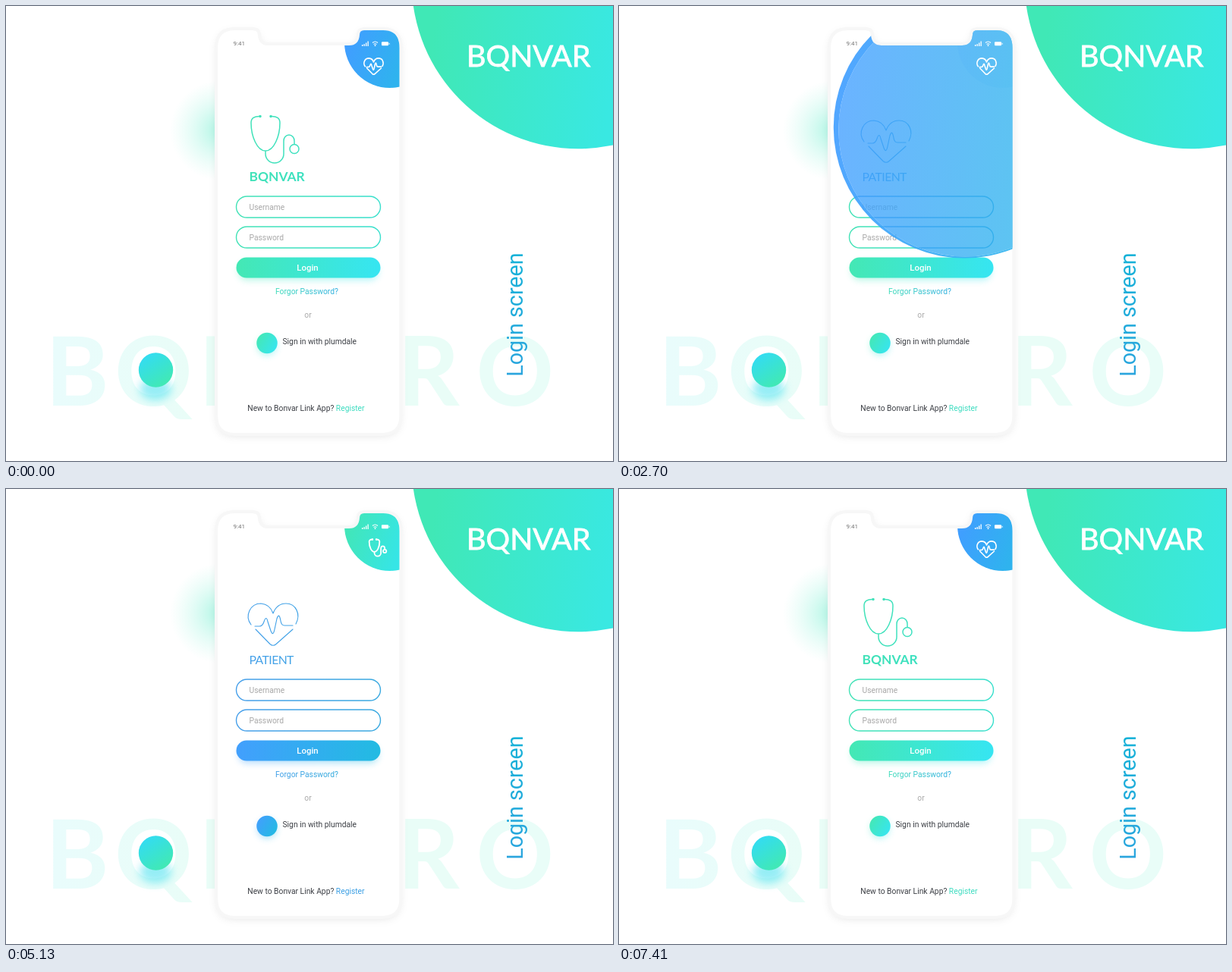
These frames come from a looping animation (800x600 px, 7500 ms). An HTML page:

```html
<!DOCTYPE html>
<html lang="en">
<head>
<meta charset="utf-8">
<title>Login screen</title>
<style>
  html, body { margin: 0; width: 100%; height: 100%; overflow: hidden; background: #fff; }
  svg { display: block; width: 100vw; height: 100vh; }
  text { font-family: Roboto, "Open Sans", sans-serif; font-size: 10.3px; }
  .brand { font-family: Lato, "Open Sans", sans-serif; }
  .line { fill: none; stroke-linecap: round; stroke-linejoin: round; }
</style>
</head>
<body>
<svg id="stage" viewBox="0 0 800 600"></svg>
<script>
const LOOP = 7500, TO_PATIENT = 2250, TO_DOCTOR = 5390, GROW = 550, FULL = 1.42;
const clamp = v => Math.max(0, Math.min(1, v));
const mix = (a, b, u) => a + (b - a) * u;
const easeOut = u => 1 - (1 - u) ** 3;
const easeInOut = u => u < 0.5 ? 4 * u ** 3 : 1 - (2 - 2 * u) ** 3 / 2;

const grad = (id, x1, y1, x2, y2, a, b) =>
  `<linearGradient id="${id}" gradientUnits="userSpaceOnUse" x1="${x1}" y1="${y1}" x2="${x2}" y2="${y2}">
    <stop stop-color="${a}"/><stop offset="1" stop-color="${b}"/></linearGradient>`;

const BODY = "M301 32H325Q332 32 332 38Q333 52 346 52H452Q465 52 466 38Q466 32 472 32H497" +
  "Q518.500 32 518.500 55V540Q518.500 563 496 563H301Q279 563 279 540V55Q279 32 301 32Z";

const STETH = `<path d="M335 145.500Q323 145 323 154C323 172 331 191 342 191S361 172 361 154
  Q361 145 349 145.500M342 191V195A12 12 0 0 0 366 195V178A7 8 0 0 1 380 178V182"/>
  <circle cx="380" cy="188.500" r="6"/><circle cx="335" cy="145.500" r="1"/><circle cx="349" cy="145.500" r="1"/>`;
const HEART = `<path d="M323 179C314 167 322 151 336 151Q348 152 352 164Q357 151 369 151C382 151 389 165 382 178
  M329 185L348 204.500Q352 208 356 204.500L378 185
  M328 181H334Q338 181 340 175Q343 166 345 175L349 187Q352 195 354 185L357 171Q360 162 362 174Q363 180 367 180H378"/>`;

const modes = {
  doctor: {
    icon: STETH, width: 1.5, title: "BQNVAR", size: 17.4, weight: 700, spacing: 0, link: "#3ddcc0",
    button: ["#44e8b4", "#36e5f2"], ink: ["#42e2b6", "#38dfcc"], text: ["#3fdcba", "#2caee0"]
  },
  patient: {
    icon: HEART, width: 1.15, title: "PATIENT", size: 15.8, weight: 400, spacing: -0.6, link: "#3b9fe4",
    button: ["#429ffd", "#22bbe2"], ink: ["#48a0ea", "#3aa9e0"], text: ["#42a0e8", "#2fa9dc"]
  }
};

const field = (y, label, ink) =>
  `<rect x="303.500" y="${y}" width="190" height="28" rx="14" fill="none" stroke="url(#${ink})" stroke-width="1.400"/>
   <text x="320.500" y="${y + 17.9}" fill="#a8a8a8">${label}</text>`;

function screen(name) {
  const m = modes[name], ink = name + "Ink", btn = name + "Btn", txt = name + "Txt", fb = name + "Dot";
  return `<defs>
    ${grad(btn, 303, 340, 494, 350, ...m.button)}
    ${grad(ink, 303, 0, 494, 0, ...m.ink)}
    ${grad(txt, 355, 0, 438, 0, ...m.text)}
    ${grad(fb, 331, 436, 358, 452, ...m.button)}</defs>
  <g id="${name}">
    <path d="${BODY}" fill="#fff"/>
    <g class="line" stroke="url(#${ink})" stroke-width="${m.width}">${m.icon}</g>
    <text class="brand" x="320.500" y="231.300" fill="url(#${ink})"
      style="font-size:${m.size}px;font-weight:${m.weight};letter-spacing:${m.spacing}px">${m.title}</text>
    ${field(251, "Username", ink)}${field(291, "Password", ink)}
    <rect x="306" y="337" width="185" height="25" rx="12" fill="url(#${btn})" opacity=".35" filter="url(#soft)"/>
    <rect x="303.500" y="331.500" width="190" height="27" rx="13.500" fill="url(#${btn})"/>
    <text x="397.500" y="349" fill="#fff" text-anchor="middle" style="font-size:11.4px;font-weight:500">Login</text>
    <text x="355" y="379.700" fill="url(#${txt})">Forgor Password?</text>
    <circle cx="344" cy="448" r="13" fill="url(#${fb})" opacity=".35" filter="url(#soft)"/>
    <circle cx="344" cy="444.500" r="13.700" fill="url(#${fb})"/>
    <g id="${name}Late">
      <text x="398" y="410.500" text-anchor="middle" fill="#aaa">or</text>
      <text x="364.500" y="446.300" fill="#3c3f45">Sign in with plumdale</text>
    </g>
    <text x="318.300" y="534" fill="#3c3f45">New to Bonvar Link App? <tspan fill="${m.link}">Register</tspan></text>
  </g>`;
}

const corner = (name, fill, icon, cx, cy, scale, x, y, width) =>
  `<g id="${name}Corner">
    <circle id="${name}Disc" cx="506" cy="48" r="60" fill="url(#${fill})"/>
    <circle id="${name}Tap" cx="490" cy="78" r="19.500" fill="#fff"/>
    <g id="${name}Icon"><g class="line" stroke="currentColor" stroke-width="${width}"
      transform="translate(${x} ${y}) scale(${scale}) translate(${-cx} ${-cy})">${icon}</g></g>
  </g>`;

document.getElementById("stage").innerHTML = `
<defs>
  ${grad("hero", 560, 60, 800, 90, "#40e8b6", "#39e8e2")}
  ${grad("dot", 182, 462, 208, 500, "#33dcf2", "#41e9b4")}
  ${grad("pale", 60, 0, 260, 0, "#e9fcfc", "#e9fdf7")}
  ${grad("side", 0, 0, 163, 0, "#2ba5de", "#16b2d8")}
  ${grad("green", 446, 60, 518, 85, "#42e6b8", "#36e5e6")}
  ${grad("blue", 446, 60, 518, 85, "#409eff", "#2fb3ee")}
  ${grad("greenFill", 279, 300, 518, 320, "#40e6b8", "#38e6e2")}
  ${grad("blueFill", 279, 300, 518, 320, "#409eff", "#2fb3ee")}
  <radialGradient id="halo"><stop stop-color="#5cecc8" stop-opacity=".5"/>
    <stop offset=".5" stop-color="#7cf0d4" stop-opacity=".24"/>
    <stop offset="1" stop-color="#a0f4e0" stop-opacity="0"/></radialGradient>
  <filter id="soft" x="-30%" y="-60%" width="160%" height="220%"><feGaussianBlur stdDeviation="4"/></filter>
  <filter id="wide" x="-60%" y="-60%" width="220%" height="220%"><feGaussianBlur stdDeviation="6"/></filter>
  <clipPath id="body"><path d="${BODY}"/></clipPath>
  <clipPath id="hole"><circle id="holeShape"/></clipPath>
</defs>
<rect width="800" height="600" fill="#fff"/>
<text class="brand" x="52 143 254 335 425 516" y="527" fill="url(#pale)" style="font-size:127px;font-weight:700">BQNVAR</text>
<text class="brand" x="619.500" y="527" fill="#e9fdf8" style="font-size:127px;font-weight:700">O</text>
<circle cx="754" cy="-31" r="219.300" fill="url(#hero)"/>
<text class="brand" x="607" y="79.500" fill="#fff" stroke="#fff" stroke-width=".8" style="font-size:39.5px">BQNVAR</text>
<text transform="translate(680.700 488.800) rotate(-90)" fill="url(#side)" style="font-size:28.7px">Login screen</text>
<ellipse cx="197" cy="505" rx="21" ry="15" fill="#3fe0ee" opacity=".55" filter="url(#wide)"/>
<circle cx="197.500" cy="480" r="22.700" fill="url(#dot)"/>
<circle cx="282" cy="164" r="66" fill="url(#halo)"/>
<path d="${BODY}" fill="#777" opacity=".22" transform="translate(0 3)" filter="url(#wide)"/>
<path d="${BODY}" fill="#f7f7f7" stroke="#f7f7f7" stroke-width="8"/>
<g clip-path="url(#body)">
  <g id="base"></g>
  <circle id="wave"/>
  <g id="fresh" clip-path="url(#hole)"></g>
  <circle id="tint"/>
  ${corner("doctor", "blue", HEART, 352, 179, 0.385, 484.5, 79.7, 4.2)}
  ${corner("patient", "green", STETH, 354.5, 176, 0.36, 490, 77.5, 5)}
  <g fill="#fff">
    <path d="M469 51h1.300v2h-1.300zM471.500 50h1.300v3h-1.300zM474 48.500h1.300v4.500h-1.300zM476.500 46.500h1.300v6.500h-1.300z"/>
    <path d="M483 48.500Q486.500 45.500 490 48.500M484.600 50.500Q486.500 49 488.400 50.500" fill="none" stroke="#fff" stroke-width="1.200"/>
    <circle cx="486.500" cy="52.200" r=".9"/>
    <rect x="495" y="47.300" width="9" height="5" rx="1"/><rect x="504.600" y="48.800" width="1" height="2"/>
  </g>
  <g id="pool">${screen("doctor")}${screen("patient")}</g>
  <text x="299.500" y="51.600" fill="#747474" style="font-size:8px">9:41</text>
</g>`;

const $ = id => document.getElementById(id);
const set = (el, attrs) => { for (const key in attrs) el.setAttribute(key, attrs[key]); };
const show = (el, on) => { el.style.display = on ? "" : "none"; };

function place(el, parent) {
  if (el.parentNode !== parent) parent.appendChild(el);
}

const pulse = (t, peak) => Math.max(0, 1 - Math.abs(t - peak) / 160);

function drawCorner(name, leaving, arriving, since, tap) {
  const s = arriving ? easeOut(clamp((since - 640) / 380)) : 1;
  const u = arriving ? clamp((since - 500) / 450) : 1;
  const e = easeInOut(u);
  const from = name === "doctor" ? [130, 200, 235] : [255, 255, 255];
  const rgb = from.map(v => Math.round(mix(v, 255, e)));
  set($(name + "Disc"), { cx: mix(518, 506, s), cy: mix(32, 48, s), r: 60 * s, opacity: leaving ? 0.1 : 1 });
  set($(name + "Icon"), {
    transform: `translate(${-7 * (1 - e)} ${40 * (1 - e)})`,
    opacity: clamp(u * 1.4),
    color: `rgb(${rgb})`
  });
  set($(name + "Tap"), { opacity: 0.25 * tap });
}

function draw(t) {
  const second = t >= TO_DOCTOR;
  const started = t >= TO_PATIENT;
  const since = t - (second ? TO_DOCTOR : TO_PATIENT);
  const k = started ? (since / GROW) ** 2.6 : 0;
  const moving = started && k < FULL;
  const next = started && !second ? "patient" : "doctor";
  const prev = next === "doctor" ? "patient" : "doctor";

  place($(next), moving ? $("fresh") : $("base"));
  place($(prev), moving ? $("base") : $("pool"));
  show($("pool"), false);
  show($("wave"), moving);
  show($("tint"), moving);

  if (moving) {
    const cx = 506 - 85 * k, cy = 48 + 187.5 * k, r = 60 + 188.5 * k;
    const fill = `url(#${second ? "greenFill" : "blueFill"})`;
    const inner = { cx: cx + 2 * k, cy: cy + 5.5 * k, r: r - 9 * k };
    const fade = k < 0.45 ? 1 : k < 1 ? mix(1, 0.17, (k - 0.45) / 0.55) : mix(0.17, 0, (k - 1) / (FULL - 1));
    set($("wave"), { cx, cy, r, fill, opacity: 1 - 0.15 * k });
    set($("holeShape"), inner);
    set($("tint"), { ...inner, fill, opacity: fade });
  }

  set($("patientLate"), { opacity: second ? 1 : clamp((t - 2940) / 250) });

  show($(prev + "Corner"), moving);
  show($(next + "Corner"), !moving || since > 500);
  drawCorner(prev, moving, false, since, started ? pulse(t, 2260) : 0);
  drawCorner(next, false, started, since, next === "doctor" ? pulse(t, 2260) : pulse(t, 4020));
}

function tick() {
  draw(performance.now() % LOOP);
  requestAnimationFrame(tick);
}
tick();
</script>
</body>
</html>
```
